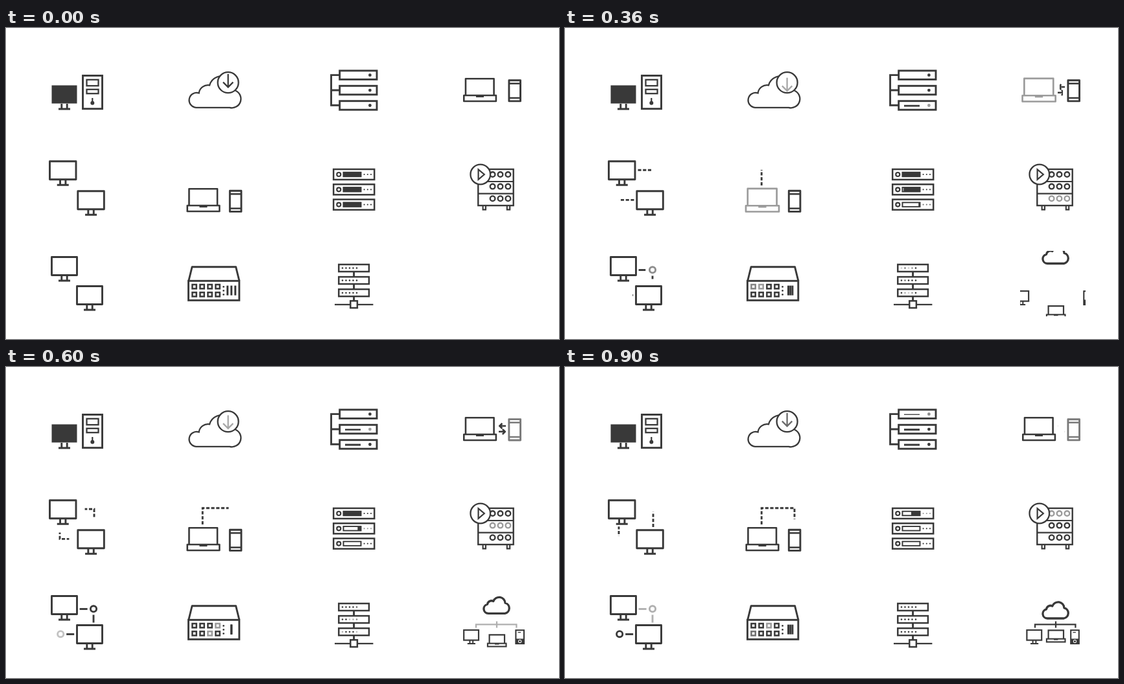
Animation of 853x480 px, one loop 960 ms. Source, as an HTML page:

```html
<!DOCTYPE html>
<html lang="en">
<head>
<meta charset="utf-8">
<title>Network icons</title>
<style>
html, body { margin: 0; width: 100%; height: 100%; overflow: hidden; background: #fff; }
svg { display: block; width: 100%; height: 100%; }
.i { fill: none; stroke: #393939; stroke-width: 2.9; }
.f { fill: #393939; stroke: none; }
.w { fill: #fff; }
.n { stroke: none; }
</style>
</head>
<body>
<svg id="stage" viewBox="0 0 853 480"></svg>
<script>
const LOOP = 960, STEP = 60;
const stage = document.getElementById('stage');

// ---- shape helpers ----
const rect = (x, y, w, h, a = '') => `<rect x="${x}" y="${y}" width="${w}" height="${h}" ${a}/>`;
const circ = (x, y, r, a = '') => `<circle cx="${x}" cy="${y}" r="${r}" ${a}/>`;
const path = (d, a = '') => `<path d="${d}" ${a}/>`;
const group = (id, s, a = '') => `<g id="${id}" ${a}>${s}</g>`;
const shift = (x, y, s) => `<g transform="translate(${x} ${y})">${s}</g>`;
const dot = (x, y, r, id = '') => circ(x, y, r, `class="f" ${id && `id="${id}"`}`);
const sw = n => `stroke-width="${n}"`;
const round = 'stroke-linejoin="round"';
const times = (n, fn) => Array.from({ length: n }, (_, i) => fn(i)).join('');

const monitor = (x, y, w, h, fill = '') => {
  const c = x + w / 2, b = y + h;
  return rect(x + 1.5, y + 1.5, w - 3, h - 3, `${round} ${fill}`) +
    path(`M${c - 4.2} ${b - 1}v7M${c + 4.2} ${b - 1}v7M${c - 9} ${b + 7}h18`);
};
const laptop =
  path('M709 104V78.3H752.6V104', `${sw(2.6)} ${round}`) +
  rect(706.3, 104, 49.6, 9, `${sw(2.6)} ${round}`) + path('M725 105.8h12', sw(2.4));
const phone =
  rect(775.9, 80.7, 17.6, 32.2, round) + path('M775 85.8h19M775 108h19', sw(2.4));

// ---- icons ----
const desktop = monitor(69, 87, 42, 31, 'class="f"') +
  rect(118.5, 73.5, 30, 51.2) +
  rect(124.5, 79.8, 18, 9.4, sw(2.3)) + rect(124.5, 94.8, 18, 6.4, sw(2.3)) +
  path('M133.3 108v7', sw(2.2)) + dot(133.3, 115.7, 3);

const download = path('M293.2 122.8A11.5 11.5 0 1 1 297.6 100.4A14 14 0 0 1 314 88.4' +
    'A19 19 0 0 1 342 77L352 96A13.8 13.8 0 0 1 345 122.8Z', sw(2.3)) +
  circ(342.6, 84.2, 16, `class="w" ${sw(2.3)}`) +
  group('arrow', path('M342.6 71V91M334.9 83.6L342.6 91.3L350.3 83.6', sw(2.3)));

const drives = path('M514 72.6H501.6V119.2H514M501.6 96H514') +
  times(3, i => {
    const y = 72.7 + i * 23.4;
    return rect(514.7, y - 6.8, 57.3, 13.5) + dot(561.4, y, 2.4, 'led' + i) +
      path(`M523 ${y + 0.6}h24`, `id="bar${i}"`);
  });

const swap = '<clipPath id="cutA"><rect id="wipeA" y="80" height="16"/></clipPath>' +
  '<clipPath id="cutB"><rect id="wipeB" y="95.6" height="14"/></clipPath>' +
  path('M771 91H761.6M765.4 87L761.4 91L765.4 95', `${sw(2.6)} clip-path="url(#cutA)"`) +
  path('M760 99.8H769.6M765.8 95.8L769.8 99.8L765.8 103.8', `${sw(2.6)} clip-path="url(#cutB)"`);

const pair = monitor(66, 204.2, 43.5, 31) + monitor(109.3, 250.2, 43.5, 31) +
  path('M112.5 219.2H136V250', 'id="dashA"') + path('M106.5 265.4H83V244', 'id="dashB"');

const link = path('M303.2 243V217.8H354V237', 'id="dashC"');

const servers = times(3, i => {
  const y = 226 + i * 23.3;
  return rect(505.2, y - 8, 63, 16, sw(2.5)) + circ(513.3, y, 3, sw(2.2)) +
    rect(519.5, y - 4.2, 29, 8.4, 'class="f"') +
    rect(521.5, y - 2.3, 0, 4.6, `class="w n" id="slot${i}"`) +
    group('sig' + i, times(3, k => dot(552.6 + k * 5.2, y, 1.1)));
});

const rack = rect(728.3, 218, 54.4, 56, sw(2.4)) +
  path('M728 237h55M728 255.6h55', sw(2.2)) +
  path('M735.6 274v6.4h4.4v-6.4M772.8 274v6.4h4.4v-6.4', sw(2.1)) +
  times(3, i => group('row' + i,
    times(3, k => circ(750.6 + k * 11.9, 226 + i * 18.6, 3.8, sw(2.4))))) +
  circ(731.8, 226, 15.3, `class="w" ${sw(2.3)}`) +
  path('M728.6 218.3L737.8 226L728.6 233.8Z', sw(2.2));

const nodes = monitor(69, 352, 42, 31) + monitor(108, 397, 42, 31) +
  group('right', path('', 'id="lineA"') + path('', 'id="lineB"') +
    circ(135, 373.3, 4.6, 'id="ringA"')) +
  path('', 'id="lineC"') + circ(84.2, 412.2, 4.6, 'id="ringB"');

const hub = path('M281.8 390L287 368.8H354.6L359.8 390', round) +
  rect(281.4, 390.3, 78.4, 30) +
  times(8, n => rect(287.4 + (n % 4) * 12, 396 + (n >> 2) * 12.1, 6.3, 6.3,
    `id="port${n}" ${sw(2.5)}`)) +
  times(3, i => dot(335.6, 399.4 + i * 6, 1.4)) +
  times(3, i => path('M347.7 397.6v15', `id="vent${i}" ${sw(3)}`));

const tree = path('M536.6 376v8M536.6 395v8M536.6 414v7') +
  times(3, i => rect(513.3, 365 + i * 19.1, 46.6, 11, sw(2.5)) +
    times(5, k => dot(519 + k * 5.5, 370.5 + i * 19.1, 1.3, 'blink' + (i * 5 + k)))) +
  rect(531.3, 421.2, 10.6, 10.8, sw(2.5)) + path('M507 426.8h24M542 426.8h24.4', sw(2.3));

const cloudNet = '<clipPath id="frame"><rect x="702" y="344" width="101" height="101"/></clipPath>' +
  group('net',
    group('puff', path('M744 388A7.2 7.2 0 0 1 742.5 373.8A6.5 6.5 0 0 1 751.8 369' +
      'A9.4 9.4 0 0 1 770 371.8A8.3 8.3 0 0 1 769.5 388Z', `${sw(3.3)} ${round}`)) +
    group('bus', path('M725 402.5V397.4H787.4V402.5M757 392.5V402.5', sw(2.3))) +
    group('west', rect(712.4, 406, 22.8, 15.6, sw(2.2)) +
      path('M721.6 421v5.5M726.4 421v5.5M718 427h12.2', sw(2))) +
    group('south', path('M745.6 419.4V406.4H769V419.4', sw(2.2)) +
      rect(742.9, 419.6, 28.6, 4.8, sw(2.1)) + path('M754 420.6h6.5', sw(1.8))) +
    group('east', rect(780.2, 406.2, 12.6, 20.8, sw(2.1)) + path('M783.4 409.6h4.5', sw(1.3)) +
      rect(780, 419.4, 13, 8, 'class="f"') + circ(786.5, 423.4, 2.6, 'class="w n"') +
      dot(786.5, 423.4, 1.6)),
    'clip-path="url(#frame)"');

stage.innerHTML = `<g class="i">${[
  desktop, download, drives,
  group('lapA', laptop), group('phone', phone), swap,
  pair, shift(-426.6, 170, group('lapB', laptop)), shift(-430.6, 170.5, phone), link,
  servers, rack, nodes, hub, tree, cloudNet
].join('')}</g>`;

// ---- motion helpers ----
const els = {};
stage.querySelectorAll('[id]').forEach(e => els[e.id] = e);
const set = (id, name, v) => els[id].setAttribute(name, v);
const fade = (id, v) => set(id, 'opacity', v);
const move = (id, x, y) => set(id, 'transform', `translate(${x} ${y})`);
const zoom = (id, s, x, y) =>
  set(id, 'transform', `translate(${x} ${y}) scale(${s}) translate(${-x} ${-y})`);

const clamp = v => Math.max(0, Math.min(1, v));
const ramp = (t, a, b) => clamp((t - a) / (b - a));
const ease = (t, a, b) => 1 - (1 - ramp(t, a, b)) ** 2;
const hump = (t, a, b) => Math.sin(Math.PI * ramp(t, a, b)) ** 2;
const dip = (t, a, b, depth = 0.5) => 1 - depth * clamp(Math.min(t - a, b - t) / 90);
const noise = n => { const s = Math.sin(n * 12.9898 + 4) * 43758.5453; return s - Math.floor(s); };

// show only the dashes lying between a and b along the path
function dashes(id, a, b) {
  const out = [0];
  let pos = 0;
  for (let d = 0; d < b; d += 7.7) {
    const p = Math.max(a, d), q = Math.min(b, d + 5.1);
    if (q > p) { out.push(p - pos, q - p); pos = q; }
  }
  set(id, 'stroke-dasharray', out.concat(999).join(' '));
}

const rowStart = [800, 400, 125];      // stacked units wake from the bottom up
const portOrder = [0, 1, 3, 6, 4, 2];

function draw(t) {
  move('arrow', 0, 6 * hump(t, 0, 830));
  fade('arrow', 1 - 0.58 * Math.sqrt(Math.sin(Math.PI * t / LOOP)));

  rowStart.forEach((s, i) => {
    set('bar' + i, 'stroke-width', 3 * ease(t, s + 25, s + 325));
    fade('led' + i, dip(t, s + 25, s + 355));
    set('slot' + i, 'width', 25 * ramp(t, s - 50, s + 250));
    fade('sig' + i, dip(t, s - 50, s + 290));
    fade('row' + i, dip(t, s, s + 380));
  });

  for (const id of ['lapA', 'lapB']) {
    fade(id, dip(t, 150, 460));
    zoom(id, 1 + 0.05 * hump(t, 100, 460), 731, 95.5);
  }
  fade('phone', dip(t, 540, LOOP));
  zoom('phone', 1 + 0.05 * hump(t, 560, 900), 784.7, 97);

  const tail = 11.4 * ease(t, 600, LOOP);
  const span = Math.max(0, 11.4 * ramp(t, 100, 460) - tail);
  set('wipeA', 'x', 771.2 - tail - span);
  set('wipeB', 'x', 759.8 + tail);
  for (const id of ['wipeA', 'wipeB']) set(id, 'width', span);

  const across = 26 * ease(t, 120, 540), turn = ease(t, 480, LOOP);
  const gone = 28 * ramp(t, 470, 870);
  dashes('dashA', gone, across + 28 * turn);
  dashes('dashB', gone, across + 17 * turn);
  dashes('dashC', 0, 25 * ease(t, 120, 420) + 69 * ease(t, 400, LOOP));

  fade('right', 1 - 0.65 * ramp(t, 600, 920));
  set('lineA', 'd', `M113.6 373.5h${12 * ease(t, 120, 480)}`);
  set('lineB', 'd', `M135 382.5v${12 * ramp(t, 220, 560)}`);
  set('lineC', 'd', `M105.2 412.4h${-12 * ramp(t, 340, 600)}`);
  fade('ringA', ramp(t, 90, 560));
  fade('ringB', ramp(t, 490, 850));

  portOrder.forEach((n, k) => fade('port' + n, dip(t, 100 + 130 * k, 430 + 130 * k)));
  const gap = 6 * (1 - hump(t, 110, 1150));
  for (let i = 0; i < 3; i++) move('vent' + i, (i - 1) * gap, 0);

  for (let n = 0; n < 15; n++) {
    const s = 110 + 330 * noise(n);
    fade('blink' + n, dip(t, s, s + 250, 0.75));
  }

  const off = 68 * (1 - ramp(t, 0, 900)) ** 2;
  move('puff', 0, -off);
  move('west', -off * 0.82, 0);
  move('east', off * 0.82, 0);
  move('south', 0, off * 0.93);
  fade('bus', ramp(t, 420, 870));
}

function tick() {
  draw(Math.floor(performance.now() / STEP) * STEP % LOOP);
  requestAnimationFrame(tick);
}
tick();
</script>
</body>
</html>
```
